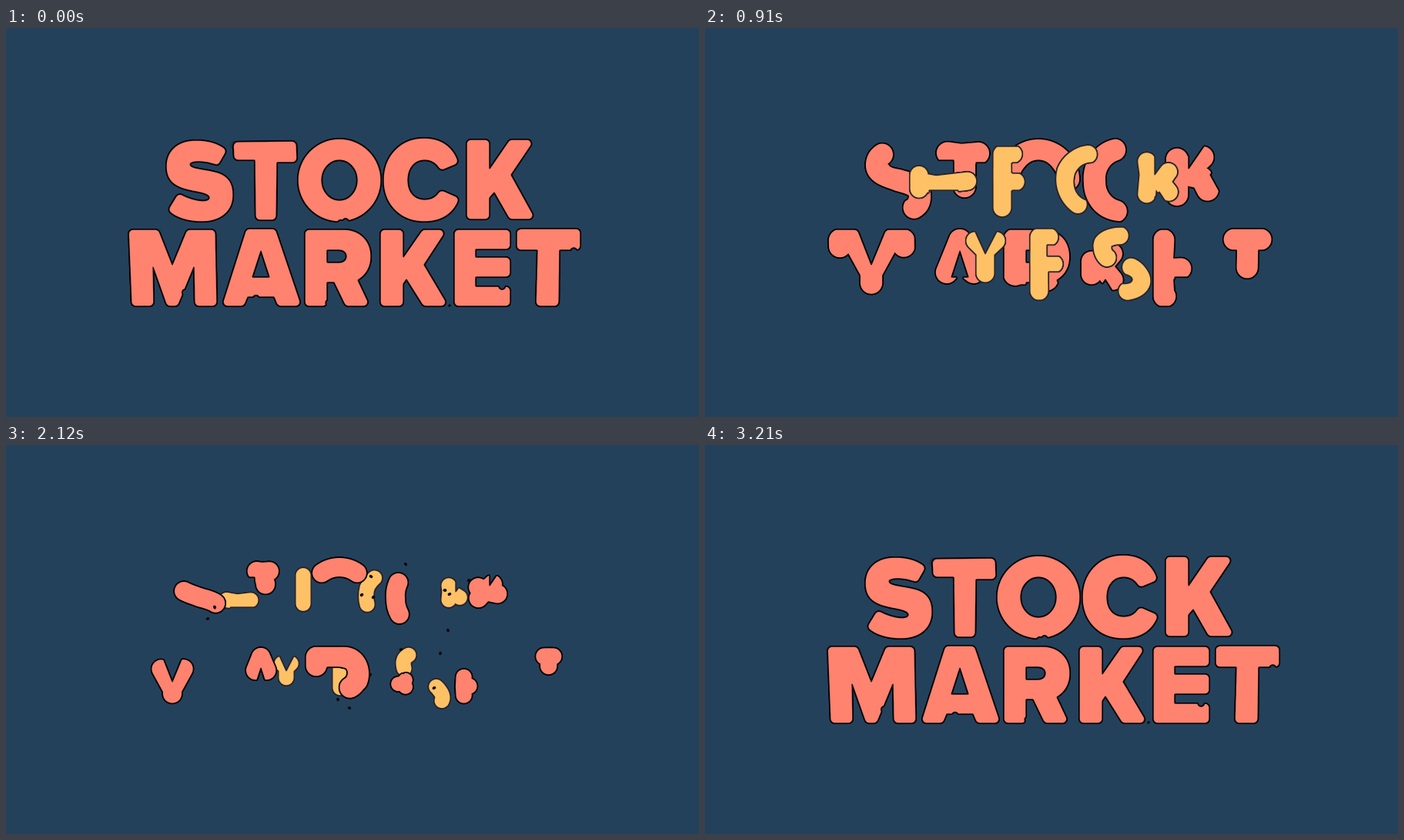
These frames come from a looping animation (900 by 506 pixels, 3280 ms). An HTML page with a canvas:

```html
<!DOCTYPE html>
<html lang="en">
<head>
<meta charset="utf-8">
<title>Stock market, heck yes</title>
<style>
html, body { margin: 0; width: 100%; height: 100%; overflow: hidden; background: #24415c; }
canvas { display: block; }
</style>
</head>
<body>
<canvas id="stage" width="900" height="506" role="img" aria-label="STOCK MARKET / HECK YES"></canvas>
<script>
const HALF = 100, SIZE = 2 * HALF, SCALE = 2;
const stage = document.getElementById('stage').getContext('2d');

// Each letter: outline, spines growing from a shared start, options.
const stockMarket = [
  ['M287 159L275 180C264 173 241 172 239 177C239 184 263 183 278 189C290 194 295 203 295 217C295 239 279 252 254 252C236 252 220 247 210 237L224 214C236 223 262 229 264 221C264 213 240 214 225 207C213 202 208 193 208 180C208 160 222 146 247 146C264 146 277 150 287 159Z',
    'M251 198C238 193 223 190 223 178C223 163 238 160 250 160C262 160 272 163 282 170M251 198C264 202 279 204 279 219C279 234 266 238 253 238C240 238 228 234 217 226'],
  ['M295 148L377 147L378 175L352 175L351 250L324 250L323 172L296 172Z',
    'M333 165L296 160M333 165L378 161M333 165L337 180L337 250'],
  ['M379 198A54 54 0 0 1 487 198A54 54 0 0 1 379 198ZM410 198A23 26 0 0 1 456 198A23 26 0 0 1 410 198Z',
    'M433 159A39 39 0 0 1 433 237M433 159A39 39 0 0 0 433 237'],
  ['M588 176L564 186C560 177 553 172 544 172C530 172 522 183 522 198C522 213 530 223 544 223C554 223 560 218 564 210L589 221C582 242 566 252 543 252C512 252 490 230 490 198C490 166 512 143 543 143C566 143 582 155 588 176Z',
    'M506 200A37 39 0 0 1 577 181M506 200A37 39 0 0 0 577 216'],
  ['M598 145H628V183L654 145H687L656 191L688 249H654L634 214L628 221V249H598Z',
    'M622 190L613 185L613 145M622 190L613 200L613 249M622 190L672 145M622 190L645 195L672 249'],
  ['M159 262H198L216 308L235 262H272L274 362H245L244 311L223 362H209L191 311L192 362H163Z',
    'M216 318L193 276L175 276L177 362M216 318L239 276L258 276L260 362M216 318L216 346'],
  ['M312 261H350L384 362H353L348 350H314L309 362H280ZM331 290L342 324H320Z',
    'M331 276L296 362M331 276L368 362M331 276L308 336L331 336M331 276L354 336L331 336'],
  ['M388 262H438C460 262 474 277 474 297C474 312 467 322 457 328L473 362H441L426 331H417V362H388ZM417 289H433C445 289 445 305 433 305H417Z',
    'M438 276L403 276L403 362M438 276C464 276 464 318 436 318L403 318L403 362M438 276C464 276 464 318 440 318L458 362', {lag: .6}],
  ['M486 262H516V298L541 262H573L543 308L575 362H542L520 327L516 333V362H486Z',
    'M515 310L502 312L502 262M515 310L502 312L502 362M515 310L556 262M515 310L558 362', {lag: 1.5}],
  ['M582 262H655V288H610V298H655V324H610V336H655V362H582Z',
    'M594 314L596 275L655 275M594 314L655 311M594 314L596 349L655 349', {lag: 1.3}],
  ['M663 261H746V289H719L718 362H688L690 289H663Z',
    'M705 275L663 275M705 275L745 275M705 275L703 362', {lag: 1.2}]
];

const heckYes = [
  ['M265 154H291V187H329V154H355V247H329V211H291V247H265Z',
    'M300 204L278 200L278 154M300 204L278 200L278 247M300 204L342 199L342 154M300 204L342 199L342 247', {from: [-32, 12]}],
  ['M373 154H442V175H399V189H441V211H399V226H442V247H373Z',
    'M386 185L386 164L442 164M386 185L386 200L442 200M386 185L386 236L442 236', {from: [12, -25]}],
  ['M544 178L520 187C516 179 510 175 503 175C488 175 479 186 479 200C479 214 488 225 503 225C511 225 517 221 521 213L544 222C537 239 523 248 502 248C474 248 453 228 453 200C453 172 474 152 502 152C523 152 538 162 544 178Z',
    'M469 186C474 174 487 164 502 164C516 164 526 170 534 184M469 186C462 214 484 236 502 236C517 236 527 230 534 217', {from: [21, -20]}],
  ['M558 154H584V191L611 154H642L609 197L643 247H612L590 213L584 220V247H558Z',
    'M576 190L571 154M576 190L571 247M576 190L592 200L627 154M576 190L592 200L629 247', {from: [1, -23]}],
  ['M320 261H349L364 294L381 261H409L377 317V354H351V317Z',
    'M364 290L335 261M364 290L395 261M364 290L364 354', {from: [-5, -30]}],
  ['M421 261H490V282H444V297H489V317H446V333H490V354H421Z',
    'M434 295L434 272L490 272M434 295L434 307L490 307M434 295L434 343L490 343', {from: [12, -35]}],
  ['M576 271L564 289C552 281 529 279 528 286C528 294 546 293 560 299C575 304 582 313 582 326C582 345 566 356 543 356C526 356 511 350 501 340L514 322C526 332 552 337 555 328C556 320 538 319 522 314C507 309 502 300 502 288C502 270 518 259 541 259C555 259 567 263 576 271Z',
    'M516 283C517 272 530 270 542 270C553 270 562 274 570 280M516 283C516 300 528 303 541 307M562 318C558 312 550 309 541 307M562 318C576 334 558 343 540 343C526 343 516 338 508 331', {from: [3, -18]}]
];

const words = {
  stock: {
    fill: '#ff836f', line: '#050508', letters: stockMarket.map(build),
    reach: [9, 1, 12, .6, 16, .15, 18, 0, 31, 0, 36, .2, 44, .67, 49, .92, 51, 1],
    width: [0, 10, .05, 16, .12, 20, .2, 24, .67, 31, .92, 38, 1, 64]
  },
  heck: {
    fill: '#ffc166', line: '#29262d', letters: heckYes.map(build),
    reach: [8, 0, 9, .05, 12, .3, 16, .92, 18, 1, 27, 1, 31, .7, 36, .2, 39, 0],
    width: [0, 12, .05, 18, .2, 19, .67, 26, .92, 34, 1, 56]
  }
};

// First step, last step, radius, then x,y pairs.
const specks = [
  [0, 9, 1.8, 576, 361], [50, 60, 1.8, 576, 361],
  [9, 9, 2.8, 486, 167, 443, 264],
  [14, 17, 1.7, 252, 154, 174, 296, 689, 362, 263, 227, 315, 162, 375, 152, 370, 174, 492, 183, 420, 250, 401, 222, 347, 262, 513, 265],
  [33, 39, 2.2, 262, 226, 519, 155, 574, 241, 564, 271, 431, 331, 446, 342, 473, 299, 513, 266, 601, 176],
  [34, 37, 2.3, 271, 211, 474, 171, 462, 195, 477, 198, 570, 189, 576, 194, 556, 316],
  [42, 46, 1.8, 411, 137, 574, 241, 644, 298, 359, 238, 453, 245, 590, 147]
];

function sheet(x, y) {
  const c = document.createElement('canvas');
  c.width = c.height = SIZE * SCALE;
  const g = c.getContext('2d');
  g.setTransform(SCALE, 0, 0, SCALE, (HALF - x) * SCALE, (HALF - y) * SCALE);
  g.lineCap = g.lineJoin = 'round';
  return g;
}

function put(g, src, x, y) {
  g.drawImage(src.canvas, x - HALF, y - HALF, SIZE, SIZE);
}

function spread(g, src, x, y, r, count) {
  for (let i = 0; i < count; i++) {
    const a = i / count * 2 * Math.PI;
    put(g, src, x + r * Math.cos(a), y + r * Math.sin(a));
  }
}

function build([outline, spines, {lag = 1, from} = {}]) {
  const branches = spines.split('M').slice(1).map(s => {
    const el = document.createElementNS('http://www.w3.org/2000/svg', 'path');
    el.setAttribute('d', 'M' + s);
    const length = el.getTotalLength();
    return {path: new Path2D('M' + s), length, end: el.getPointAtLength(length)};
  });
  const [x, y] = spines.match(/\d+/g).map(Number);

  // Shrink the outline, then spread it again to round its corners.
  const core = sheet(x, y), shape = sheet(x, y), path = new Path2D(outline);
  core.fill(path, 'evenodd');
  core.globalCompositeOperation = 'destination-out';
  core.lineWidth = 10;
  core.stroke(path);
  put(shape, core, x, y);
  spread(shape, core, x, y, 4.2, 28);
  return {x, y, lag, from, branches, path, shape, ink: sheet(x, y)};
}

function keyed(v, keys) {
  if (v <= keys[0]) return keys[1];
  for (let i = 2; i < keys.length; i += 2) {
    if (v <= keys[i]) {
      const k = (v - keys[i - 2]) / (keys[i] - keys[i - 2]);
      return keys[i - 1] + k * (keys[i + 1] - keys[i - 1]);
    }
  }
  return keys[keys.length - 1];
}

function random(k) {
  const v = Math.sin(k * 12.9898 + 4.1) * 43758.5453;
  return v - Math.floor(v);
}

function dot(g, x, y, r, tall = 1, turn = 0) {
  g.beginPath();
  g.ellipse(x, y, r, r * tall, turn, 0, 2 * Math.PI);
  g.fill();
}

// Hand-drawn notches in the edges near the stroke ends.
function nibble({ink, path, branches}, seed) {
  const inside = (x, y) => stage.isPointInPath(path, x, y, 'evenodd');
  ink.globalCompositeOperation = 'destination-out';
  branches.forEach(({end}, i) => {
    const a = random(seed + i) * 2 * Math.PI;
    const x = end.x + 17 * Math.cos(a), y = end.y + 17 * Math.sin(a);
    if (!inside(x, y)) dot(ink, x, y, 5);
  });
}

function drawLetter(letter, word, step, index) {
  const reach = keyed(step, word.reach) ** letter.lag;
  if (reach < .005) return;
  const {x, y, from, ink: g} = letter;
  // Seeds drift in from outside the letter while it starts to grow.
  const drift = from && step < 20 ? Math.max(0, 1 - reach / .3) : 0;

  g.globalCompositeOperation = 'source-over';
  g.clearRect(x - HALF, y - HALF, SIZE, SIZE);
  g.fillStyle = g.strokeStyle = word.line;
  g.lineWidth = keyed(reach, word.width);
  g.save();
  if (drift) g.translate(from[0] * drift, from[1] * drift);
  for (const b of letter.branches) {
    g.setLineDash(reach < 1 ? [reach * b.length, 999] : []);
    g.stroke(b.path);
  }
  g.restore();

  if (!drift) {
    g.globalCompositeOperation = 'destination-in';
    put(g, letter.shape, x, y);
  }
  if (reach > .85) nibble(letter, step * 97 + index * 11);

  spread(stage, g, x, y, 1.8, 12);
  g.globalCompositeOperation = 'source-in';
  g.fillStyle = word.fill;
  g.fillRect(x - HALF, y - HALF, SIZE, SIZE);
  put(stage, g, x, y);
}

function draw(step) {
  stage.fillStyle = '#24415c';
  stage.fillRect(0, 0, 900, 506);
  const order = step < 25 ? ['stock', 'heck'] : ['heck', 'stock'];
  for (const name of order) {
    const word = words[name];
    word.letters.forEach((letter, i) => drawLetter(letter, word, step, i));
  }
  stage.fillStyle = '#08090d';
  for (const [first, last, r, ...at] of specks) {
    if (step < first || step > last) continue;
    for (let i = 0; i < at.length; i += 2) {
      dot(stage, at[i], at[i + 1], r * .85, 1.25, random(at[i]) * 3);
    }
  }
}

// The drawings run at 70 ms each, with a quick 30 ms stretch in the middle.
function stepAt(t) {
  if (t < 1820) return Math.floor(t / 70);
  if (t < 2510) return 26 + Math.floor((t - 1820) / 30);
  const step = 49 + Math.floor((t - 2510) / 70);
  return step === 54 ? 53 : step % 59;
}

let shown = -1;
const begun = performance.now();
function tick() {
  const step = stepAt((performance.now() - begun) % 3280);
  if (step !== shown) draw(shown = step);
  requestAnimationFrame(tick);
}
tick();
</script>
</body>
</html>
```
